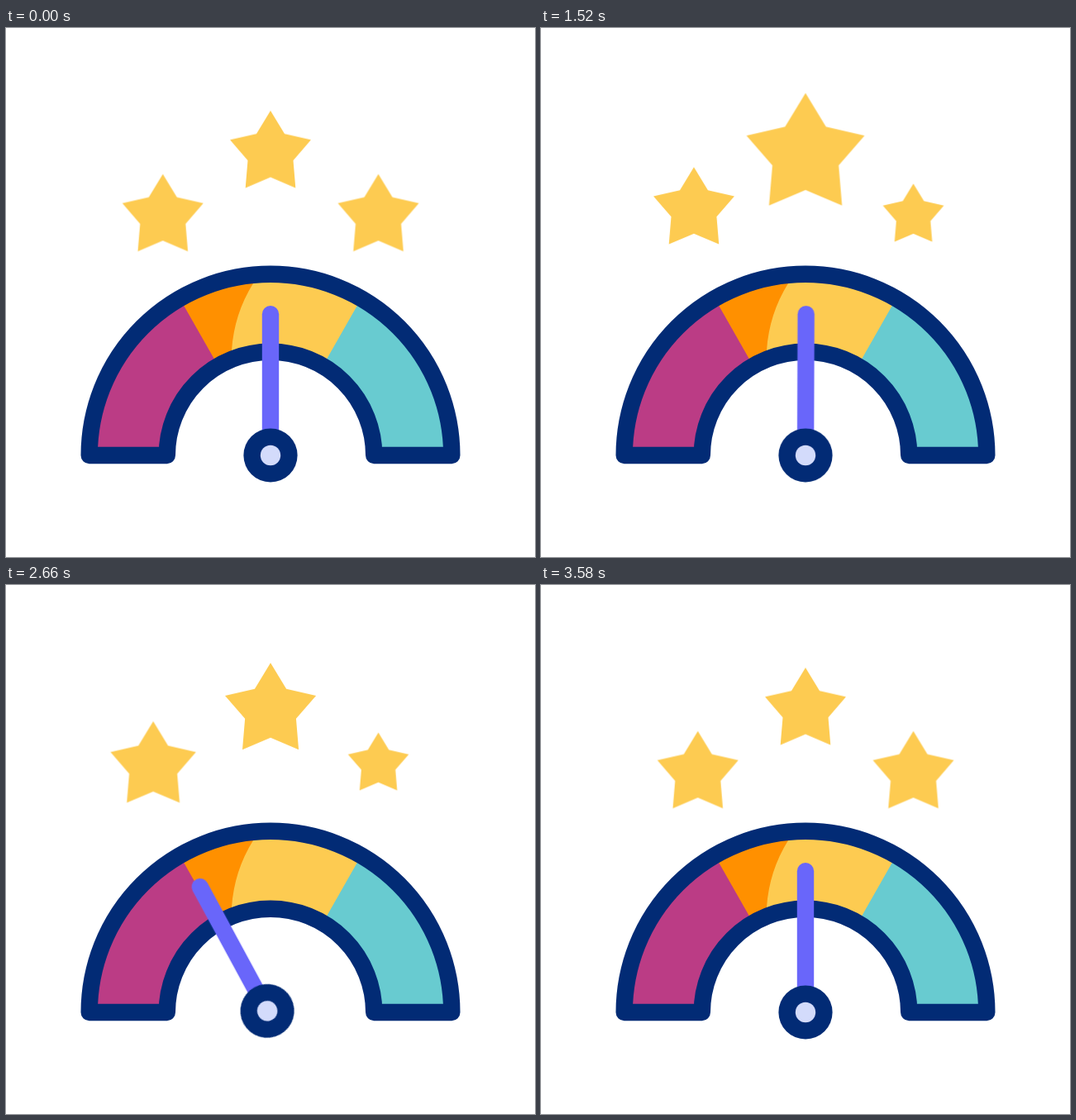
Write an HTML page without scripts that moves like this. It is 640 px wide and 640 px high and loops after 3600 ms.

```html
<!DOCTYPE html>
<html lang="en">
<head>
<meta charset="utf-8">
<title>Rating gauge</title>
<style>
  html, body { margin: 0; width: 100%; height: 100%; overflow: hidden; background: #fff; }
  svg { display: block; width: 100%; height: 100%; }

  .star { fill: #fdcb51; }
  .star, .needle {
    animation: 3.6s cubic-bezier(.33, 0, .67, 1) infinite;
  }
  .left { animation-name: left; }
  .top { animation-name: top; }
  .right { animation-name: right; }
  .needle { animation-name: swing; transform-origin: 314.7px 523.8px; }

  @keyframes swing {
    0% { transform: rotate(0deg); }
    5.556% { transform: rotate(0deg); animation-timing-function: cubic-bezier(.33, .2, .67, .78); }
    22.778%, 33.333% { transform: rotate(-57deg); }
    41.944% { transform: rotate(0deg); }
    50.556%, 61.111% { transform: rotate(57deg); }
    69.722% { transform: rotate(0deg); }
    78.6% { transform: rotate(-62deg); }
    95.556%, 100% { transform: rotate(0deg); }
  }

  @keyframes left {
    0%, 5.7% { transform: translate(0, 0) scale(1); }
    22.778%, 33.333% { transform: translate(-19px, -10.2px) scale(1.46); }
    41.944% { transform: translate(-4.7px, -8.5px) scale(1); }
    50.556%, 69.722% { transform: translate(-4.7px, -8.5px) scale(.68); }
    78.333% {
      transform: translate(-19px, -10.2px) scale(1.46);
      animation-timing-function: cubic-bezier(.33, .22, .7, 1);
    }
    95.556%, 100% { transform: translate(0, 0) scale(1); }
  }

  @keyframes top {
    0%, 5.7% { transform: scale(1); }
    22.778%, 33.333% { transform: scale(.765); }
    41.944% { transform: scale(1.46); }
    50.556%, 61.111% { transform: scale(.76); }
    69.722% { transform: scale(1.46); }
    78.333% { transform: scale(.76); animation-timing-function: linear; }
    95.556% { transform: scale(2.24); }
    99.4%, 100% { transform: scale(1); }
  }

  @keyframes right {
    0%, 5.7% { transform: translate(0, 0) scale(1); }
    22.778%, 41.944% { transform: translate(0, 0) scale(.75); }
    50.556%, 61.111% { transform: translate(0, 0) scale(1.46); }
    67.222% { transform: translate(0, -10px) scale(.895); animation-timing-function: ease-out; }
    69.722% { transform: translate(0, -10px) scale(.75); }
    78.333% { transform: translate(0, -10px) scale(.75); animation-timing-function: linear; }
    81.667% { transform: translate(0, -10px) scale(.8); }
    95.556%, 100% { transform: translate(0, 0) scale(1); }
  }
</style>
</head>
<body>
<svg viewBox="0 0 640 640">
  <defs>
    <path id="star" d="M0-46.7 17-18.7 49-11.4 27.5 13.4 30.3 46.7 0 33.8-30.3 46.7-27.5 13.4-49-11.4-17-18.7Z"/>
    <path id="arch" d="M100.7 517A219.3 219.3 0 0 1 539.3 517H445.2A125.2 125.2 0 0 0 194.8 517Z"/>
    <clipPath id="band"><use href="#arch"/></clipPath>
  </defs>

  <g transform="translate(189.7 223.5)"><use class="star left" href="#star"/></g>
  <g transform="translate(320 146.7)"><use class="star top" href="#star"/></g>
  <g transform="translate(450.5 223.5)"><use class="star right" href="#star"/></g>

  <g clip-path="url(#band)">
    <path fill="#fdcb51" d="M180 270H460V520H180Z"/>
    <path fill="#ff9000" d="M180 270H322L299 309Q276 346 273 390L270 430H180Z"/>
    <path fill="#bb3c85" d="M320 520 176.5 268H80V520Z"/>
    <path fill="#68cbd0" d="M320 520 463.5 268H560V520Z"/>
  </g>
  <use href="#arch" fill="none" stroke="#022b75" stroke-width="20.4" stroke-linejoin="round"/>

  <g class="needle">
    <path d="M320 346.3V517" stroke="#6966fa" stroke-width="20.4" stroke-linecap="round"/>
    <circle cx="320" cy="517" r="32.6" fill="#022b75"/>
    <circle cx="320" cy="517" r="12.2" fill="#d3dbfb"/>
  </g>
</svg>
</body>
</html>
```
